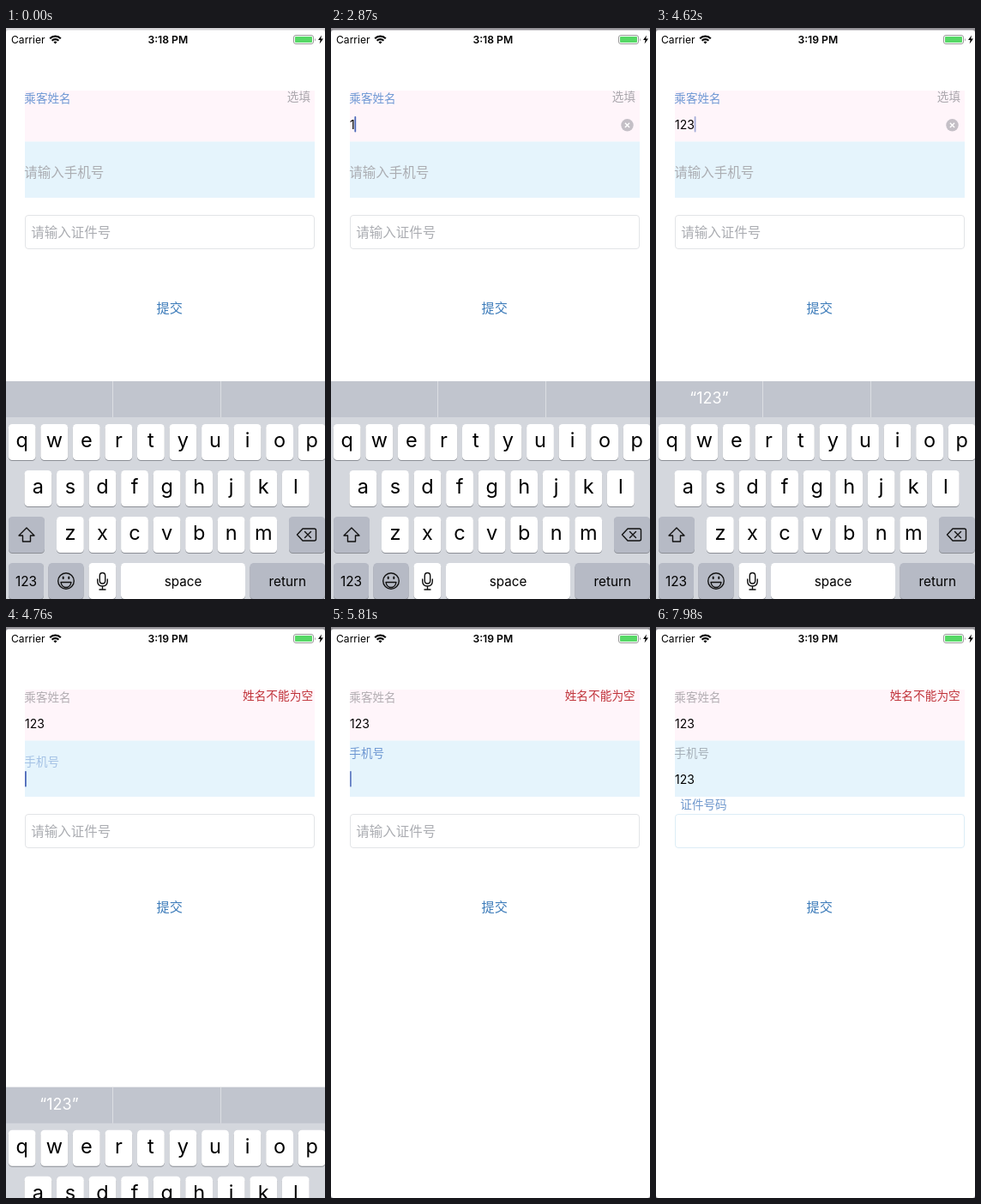
Animation, 372 px wide and 666 px high, one loop 8 s. Source, as an HTML page:

```html
<!DOCTYPE html>
<html lang="zh">
<head>
<meta charset="utf-8">
<style>
html, body { margin: 0; width: 100%; height: 100%; overflow: hidden; background: #8f8d92 }
svg { display: block; width: 372px; height: 666px; font-family: Inter, "Noto Sans CJK SC", "Noto Sans CJK", sans-serif }
.label { font-size: 13.6px }
.hint { font-size: 15.5px; fill: #abadb2 }
.value { font-size: 14px }
.mid { text-anchor: middle }
.end { text-anchor: end }
.line { fill: none; stroke: #111; stroke-width: 1.4; stroke-linejoin: round; stroke-linecap: round }
</style>
</head>
<body>
<svg viewBox="0 0 372 666">
  <rect id="edge" width="372" height="8"/>
  <rect y="2.6" width="372" height="663.4" rx="3" fill="#fff"/>

  <text x="6" y="17.5" font-size="12.1">Carrier</text>
  <g fill="none" stroke="#000" stroke-width="2.1">
    <path d="M51.2 12.3a8.8 8.8 0 0 1 12.6 0M53.6 14.8a5.4 5.4 0 0 1 7.8 0"/>
    <path d="M57.5 18.6l-2-2.1a2.9 2.9 0 0 1 4 0z" fill="#000" stroke="none"/>
  </g>
  <text id="clock" class="mid" x="188.8" y="17.5" font-size="12.2" font-weight="600"></text>
  <rect x="335.5" y="8.5" width="23" height="10" rx="2.5" fill="none" stroke="#999"/>
  <rect x="337" y="10" width="20" height="7" rx="1" fill="#56d866"/>
  <path d="M360 11.5q1.6 2 0 4z" fill="#999"/>
  <path d="M368 8.5l-4 5.5h2.6l-1 4.5 4.4-6h-2.8z"/>

  <rect x="22" y="73" width="338" height="59.5" fill="#fff5fa"/>
  <rect x="22" y="132.5" width="338" height="65.5" fill="#e5f4fc"/>
  <rect id="box" x="22.5" y="218.5" width="337" height="39" rx="3.5" fill="#fff"/>

  <text id="nameLabel" class="label" x="21.3" y="87.3">乘客姓名</text>
  <text id="optional" class="label end" x="355" y="85.3" fill="#a9a6ac">选填</text>
  <text id="error" class="end" y="85.3" font-size="13.7" fill="#c0333a">姓名不能为空</text>
  <text id="name" class="value" x="22" y="118"></text>

  <text id="phoneHint" class="hint" x="21.3" y="174.3">请输入手机号</text>
  <text id="phoneLabel" class="label" x="21.3">手机号</text>
  <text id="phone" class="value" x="22" y="183"></text>

  <text id="idHint" class="hint" x="29.3" y="244.3">请输入证件号</text>
  <text id="idLabel" class="label" x="28.3" fill="#6f98cd">证件号码</text>

  <g id="clear">
    <circle cx="345.5" r="7.2" fill="#84848f" fill-opacity=".48"/>
    <path d="M342.9-2.6l5.2 5.2m0-5.2l-5.2 5.2" stroke="#fff" stroke-width="1.4"/>
  </g>
  <rect id="caret" width="1.8" height="18.5" rx=".8" fill="#4a66b8"/>
  <text class="mid" x="190.7" y="332" font-size="15.2" fill="#3d7cba">提交</text>

  <g id="board">
    <rect y="412" width="372" height="254" fill="#d4d7dd"/>
    <rect y="412" width="372" height="42" fill="#c1c5ce"/>
    <path d="M124.5 412v42M250.5 412v42" stroke="#dcdee3"/>
    <text id="guess" class="mid" x="62" y="438" font-size="18" fill="#fff">“123”</text>
    <g id="keys"></g>
    <path class="line" d="M24 583l9 9h-4.5v7h-9v-7H15z"/>
    <path class="line" d="M346 584h13.5q2 0 2 2v10q0 2-2 2H346l-6.5-7zM348.5 587.5l7 7m0-7l-7 7"/>
    <g class="line">
      <circle cx="70" cy="645" r="9.3"/>
      <path d="M64 646.5h12q-1 6-6 6t-6-6z"/>
      <path d="M66.7 640.5v1.5m6.6-1.5v1.5" stroke-width="2"/>
      <rect x="109.3" y="635.5" width="6.4" height="12.5" rx="3.2"/>
      <path d="M106.7 643v2q0 6 5.8 6t5.8-6v-2M112.5 651v4m-3.5 0h7"/>
    </g>
  </g>
</svg>
<script>
const $ = id => document.getElementById(id);
const DARK = '#b6bac5';

function key(x, y, w, text, size, fill = '#fff') {
  const rect = (dy, color) => `<rect x="${x}" y="${y + dy}" width="${w}" height="42" rx="4.5" fill="${color}"/>`;
  const drop = size > 20 ? 27 : 26.5;
  return rect(1, '#8c8f96') + rect(0, fill) +
    `<text class="mid" x="${x + w / 2}" y="${y + drop}" font-size="${size}">${text}</text>`;
}

const rows = [['qwertyuiop', 2.8, 462], ['asdfghjkl', 21.5, 516], ['zxcvbnm', 59, 570]];
$('keys').innerHTML =
  rows.map(([letters, x, y]) => [...letters].map((c, i) => key(x + i * 37.55, y, 31.8, c, 23.5)).join('')).join('') +
  key(3, 570, 42, '', 15, DARK) + key(330, 570, 42, '', 15, DARK) +
  key(3, 624, 41, '123', 15.4, DARK) + key(49.5, 624, 41, '', 15, DARK) +
  key(96.5, 624, 31.8, '', 15) + key(134, 624, 145, 'space', 15.2) +
  key(284.5, 624, 87.5, 'return', 15.3, DARK);

const LOOP = 8000, PHONE = 4690, CARD = 7210;
const nameKeys = [2800, 3220, 3680], phoneKeys = [5880, 6090, 6370];
const caretX = [22, 27.4, 36.2, 44.7];

const clamp = v => Math.max(0, Math.min(1, v));
const ease = v => 1 - (1 - clamp(v)) ** 2;
const show = (id, on) => $(id).setAttribute('opacity', +on);
const set = (id, attrs) => { for (const k in attrs) $(id).setAttribute(k, attrs[k]); };
const typed = (keys, t) => keys.filter(k => k <= t).length;

// Solid, fade out, hidden, fade in, once a second.
function blink(age) {
  const p = Math.max(0, age) % 1000;
  return p < 880 ? 1 - clamp((p - 400) / 150) : (p - 880) / 120;
}

function floatLabel(id, age, from, to) {
  const k = ease(age / 220);
  set(id, { y: from + (to - from) * k, opacity: k });
}

function draw(t) {
  const onPhone = t >= PHONE, onCard = t >= CARD;
  const n = typed(nameKeys, t), p = typed(phoneKeys, t);

  set('edge', { fill: t < 700 ? '#d4d3d6' : '#949297' });
  $('clock').textContent = t < 4000 ? '3:18 PM' : '3:19 PM';
  $('name').textContent = '123'.slice(0, n);
  $('phone').textContent = '123'.slice(0, p);

  set('nameLabel', { fill: onPhone ? '#b2adb2' : '#6f98d4' });
  set('phoneLabel', { fill: onCard ? '#a5afb8' : '#6d97d2' });
  set('box', { stroke: onCard ? '#dcedf6' : '#e2e4e7' });
  show('optional', !onPhone);
  show('error', onPhone);
  const age = t - PHONE;
  const shake = onPhone ? 6 * Math.exp(-age / 150) * Math.sin(age / 34.4) : 0;
  set('error', { x: 354.8 + shake });

  show('phoneHint', !onPhone);
  show('idHint', !onCard);
  floatLabel('phoneLabel', age, 174, 152.3);
  floatLabel('idLabel', t - CARD, 244, 212.3);

  const count = onCard ? 0 : onPhone ? p : n;
  show('clear', count > 0);
  set('clear', { transform: `translate(0 ${onPhone ? 178.3 : 113.3})` });

  const starts = [-790, 210, ...nameKeys, 4830, ...phoneKeys, 7300];
  const last = starts.filter(k => k <= t).pop();
  const fresh = onPhone && t < 4830 || onCard && t < 7300;
  set('caret', {
    x: onCard ? 29.5 : caretX[count],
    y: onCard ? 229 : onPhone ? 168 : 103,
    opacity: fresh ? 1 : blink(t - last)
  });

  show('guess', t >= 3740);
  set('board', { transform: `translate(0 ${256 * ease((t - PHONE) / 250)})` });
}

function tick(now) {
  draw(now % LOOP);
  requestAnimationFrame(tick);
}
draw(0);
requestAnimationFrame(tick);
</script>
</body>
</html>
```
